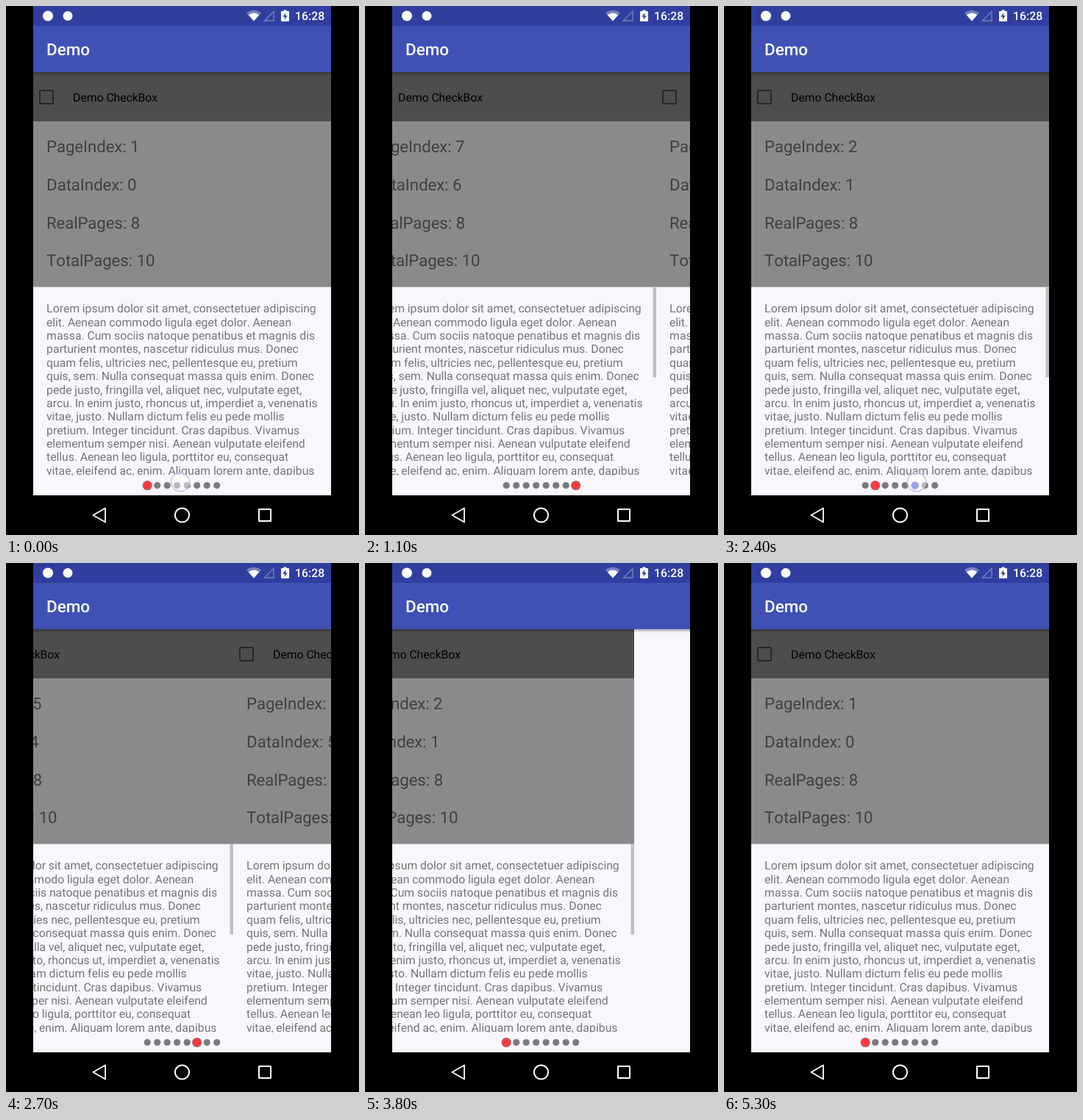
Animation of 480 by 720 pixels, one loop 5.4 s. Source, as an HTML page with a canvas:

```html
<!DOCTYPE html>
<html lang="en">
<head>
<meta charset="utf-8">
<title>Pager demo</title>
<style>
html, body { margin: 0; width: 100%; height: 100%; overflow: hidden; background: #000; }
canvas { display: block; }
</style>
</head>
<body>
<canvas id="stage" width="480" height="720"></canvas>
<script>
const g = document.getElementById('stage').getContext('2d');
const LOOP = 5400, STEP = 100, LEFT = 37, WIDTH = 405, PAGES = 8;
const SCALE = 405 / 1080; // the phone screen is 1080 px wide
const PAPER = '#f9f7fc';

// Each tap presses a dot, then the pager scrolls to that page.
const taps = [
  { down: 0, go: 110, from: 0, to: 3, x: 237, y: 648 },
  { down: 800, go: 970, from: 3, to: 7, x: 288, y: 648 },
  { down: 1500, go: 1674, from: 7, to: 1, x: 208, y: 648 },
  { down: 2300, go: 2550, from: 1, to: 5, x: 262, y: 648 },
  { down: 3400, go: 3650, from: 5, to: 0, x: 186, y: 651 }
];

const lorem = `Lorem ipsum dolor sit amet, consectetuer adipiscing
elit. Aenean commodo ligula eget dolor. Aenean
massa. Cum sociis natoque penatibus et magnis dis
parturient montes, nascetur ridiculus mus. Donec
quam felis, ultricies nec, pellentesque eu, pretium
quis, sem. Nulla consequat massa quis enim. Donec
pede justo, fringilla vel, aliquet nec, vulputate eget,
arcu. In enim justo, rhoncus ut, imperdiet a, venenatis
vitae, justo. Nullam dictum felis eu pede mollis
pretium. Integer tincidunt. Cras dapibus. Vivamus
elementum semper nisi. Aenean vulputate eleifend
tellus. Aenean leo ligula, porttitor eu, consequat
vitae, eleifend ac, enim. Aliquam lorem ante, dapibus`.split('\n');

function rect(x, y, w, h, color) {
  g.fillStyle = color;
  g.fillRect(x, y, w, h);
}

function disc(x, y, r, color) {
  g.fillStyle = color;
  g.beginPath();
  g.arc(x, y, r, 0, Math.PI * 2);
  g.fill();
}

function ring(x, y, r, color, width) {
  g.strokeStyle = color;
  g.lineWidth = width;
  g.beginPath();
  g.arc(x, y, r, 0, Math.PI * 2);
  g.stroke();
}

function poly(points) {
  g.beginPath();
  points.forEach(([x, y]) => g.lineTo(x, y));
  g.closePath();
}

// The phone lays glyphs out on whole pixels of its own screen.
function text(str, x, y, size, color, weight = 400) {
  g.save();
  g.translate(x, y);
  g.scale(SCALE, SCALE);
  g.textRendering = 'geometricPrecision';
  g.font = `${weight} ${size / SCALE}px Roboto, sans-serif`;
  g.fillStyle = color;
  let pen = 0;
  for (const ch of str) {
    g.fillText(ch, pen, 0);
    pen += Math.round(g.measureText(ch).width);
  }
  g.restore();
}

function clip(x, y, w, h, draw) {
  g.save();
  g.beginPath();
  g.rect(x, y, w, h);
  g.clip();
  draw();
  g.restore();
}

function scrollPosition(tap, t) {
  const span = tap.to - tap.from;
  const duration = Math.min(600, (Math.abs(span) + 1) * 100);
  const k = Math.min(1, Math.max(0, (t - tap.go) / duration));
  return tap.from + span * (1 - (1 - k) ** 5);
}

function barAlpha(page, t) {
  if (page === 0 && t < 1000) return 0;
  return Math.min(1, Math.max(0, (5300 - t) / 300));
}

function drawPage(page, x, t) {
  rect(x, 90, WIDTH, 292.5, '#8b898c');
  rect(x, 90, WIDTH, 67, '#4d4d4d');
  g.strokeStyle = '#272727';
  g.lineWidth = 2;
  g.beginPath();
  g.roundRect(x + 9, 115, 18, 18, 1.5);
  g.stroke();
  text('Demo CheckBox', x + 54, 130, 15.75, '#000');

  [`PageIndex: ${page + 1}`, `DataIndex: ${page}`, `RealPages: ${PAGES}`, 'TotalPages: 10']
    .forEach((line, i) => text(line, x + 18, 199 + i * 51.75, 22.2, '#403f41'));

  clip(x, 382, WIDTH, 257, () =>
    lorem.forEach((line, i) => text(line, x + 18, 417.3 + i * 18.375, 15.75, '#757477')));

  g.globalAlpha = barAlpha(page, t);
  rect(x + 400.5, 382.5, 4.5, 123, '#bfbdc1');
  g.globalAlpha = 1;
}

function drawPager(tap, t) {
  rect(LEFT, 90, WIDTH, 576, PAPER);
  const pos = scrollPosition(tap, t);
  for (let page = 0; page < PAGES; page++) {
    // Only the neighbours of the old and new page are loaded.
    const loaded = [tap.from, tap.to].some(p => Math.abs(page - p) <= 1);
    const x = LEFT + Math.round((page - pos) * WIDTH);
    if (loaded && Math.abs(x - LEFT) < WIDTH) drawPage(page, x, t);
  }
}

function drawDots(tap, t) {
  const moved = t >= tap.go;
  for (let i = 0; i < PAGES; i++) {
    const x = 192.2 + i * 13.5, y = 652.5;
    const red = (i === tap.from && t < tap.go + 50) || (i === tap.to && moved);
    const pressed = i === tap.to && t >= tap.down + 100 && !moved;
    if (red) {
      disc(x, y, 6.6, '#8f7c80');
      disc(x, y, 5.8, '#fb3a40');
    } else {
      disc(x, y, pressed ? 5.2 : 4.6, pressed ? '#3f51d8' : '#7b7a7d');
    }
  }
  if (t >= tap.down && t < tap.go + 50) {
    disc(tap.x, tap.y, 12.5, 'rgba(255,255,255,.48)');
    ring(tap.x, tap.y, 12.5, 'rgba(196,190,226,.75)', 1.8);
  }
}

function drawBars() {
  const shadow = g.createLinearGradient(0, 90, 0, 95);
  shadow.addColorStop(0, 'rgba(0,0,0,.3)');
  shadow.addColorStop(1, 'rgba(0,0,0,0)');
  rect(LEFT, 90, WIDTH, 5, shadow);
  rect(LEFT, 0, WIDTH, 27, '#303f9f');
  rect(LEFT, 27, WIDTH, 63, '#3f51b5');
  text('Demo', 55, 67, 22.5, '#fff', 500);

  disc(57, 13.5, 7, '#fff');
  disc(84, 13.5, 6.5, '#fff');
  drawSignal();
  text('16:28', 393, 19.3, 15.75, '#fff', 500);

  rect(LEFT, 666, WIDTH, 54, '#000');
  g.strokeStyle = '#fff';
  g.lineWidth = 1.8;
  g.lineJoin = 'round';
  poly([[118.5, 693], [135, 683.5], [135, 702.5]]);
  g.stroke();
  ring(239.5, 693, 9.6, '#fff', 2);
  g.strokeRect(344, 685, 16, 16);
}

function drawSignal() {
  const fan = (top, half, color) => {
    g.fillStyle = color;
    g.beginPath();
    g.moveTo(337, 20.5);
    g.lineTo(337 - half, top);
    g.quadraticCurveTo(337, top - half * .75, 337 + half, top);
    g.fill();
  };
  fan(9.5, 10, '#7580be');
  fan(12.2, 7.2, '#fff');

  g.strokeStyle = '#7580be';
  g.lineWidth = 1.4;
  poly([[351.5, 20], [364, 20], [364, 7.5]]);
  g.stroke();

  rect(377.5, 5.5, 4, 2, '#fff');
  g.fillStyle = '#fff';
  g.beginPath();
  g.roundRect(374, 7, 11, 14, 1);
  g.fill();
  g.fillStyle = '#303f9f';
  poly([[380.5, 9], [376.3, 14.7], [379, 14.7], [378.5, 19], [382.7, 13.3], [380, 13.3]]);
  g.fill();
}

function draw(t) {
  const tap = taps.findLast(p => t >= p.down);
  rect(0, 0, 480, 720, '#000');
  clip(LEFT, 0, WIDTH, 720, () => {
    drawPager(tap, t);
    drawDots(tap, t);
    drawBars();
  });
}

const start = performance.now();
let shown = -1;
function tick() {
  const now = (performance.now() - start) % LOOP;
  const t = Math.floor(now / STEP) * STEP;
  if (t !== shown) draw(shown = t);
  requestAnimationFrame(tick);
}
tick();
</script>
</body>
</html>
```
